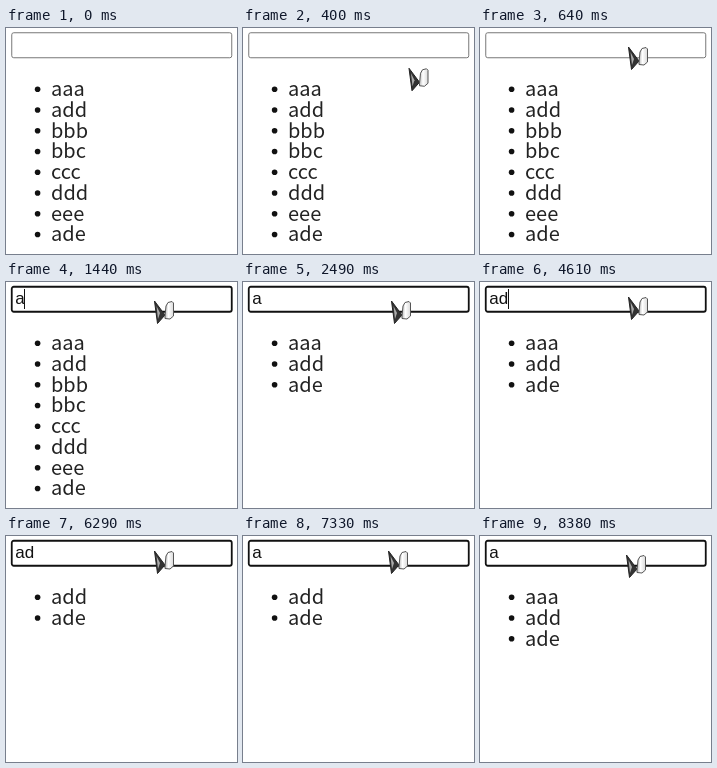
Write an HTML page with a canvas that moves like this. It is 231 px wide and 226 px high and loops after 8.62 s.

```html
<!DOCTYPE html>
<html lang="en">
<head>
<meta charset="utf-8">
<title>Filter list</title>
<style>
html, body { margin: 0; width: 100%; height: 100%; overflow: hidden; background: #fff; }
canvas { display: block; width: 231px; height: 226px; }
</style>
</head>
<body>
<canvas id="stage"></canvas>
<script>
const W = 231, H = 226, LOOP = 8620;
const FOCUS = 720, BLINK = 538, FILTER_DELAY = 1040;
const canvas = document.getElementById('stage');
const ctx = canvas.getContext('2d');
const dpr = window.devicePixelRatio || 1;
canvas.width = W * dpr;
canvas.height = H * dpr;

const words = ['aaa', 'add', 'bbb', 'bbc', 'ccc', 'ddd', 'eee', 'ade'];
const edits = [
  { time: FOCUS, text: '' }, { time: 1440, text: 'a' },
  { time: 4610, text: 'ad' }, { time: 6450, text: 'a' }
];
// Places where the pointer rests after it has come in.
const rests = [
  { time: 640, x: 149, y: 19 }, { time: 3320, x: 149, y: 17 },
  { time: 3540, x: 149, y: 20 }, { time: 4290, x: 149, y: 15 },
  { time: 6930, x: 146, y: 15 }, { time: 7850, x: 147, y: 19 }
];

const latest = (list, t) => list.findLast(e => e.time <= t);
const textAt = t => latest(edits, t)?.text ?? '';

// The blink restarts on focus and typing, but not on deleting.
function caretOn(t) {
  const inserts = edits.filter((e, i) => !i || e.text.length > edits[i - 1].text.length);
  const last = latest(inserts, t);
  return last && Math.floor((t - last.time) / BLINK) % 2 === 0;
}

function pointerAt(t) {
  if (t < 160) return null;
  const rest = latest(rests, t);
  if (rest) return rest;
  const left = (1 - Math.floor((t - 160) / 80) / 6) ** 2;
  return { x: 149 + 70 * left, y: 19 + 85 * left };
}

function poly(points, fill, stroke) {
  ctx.beginPath();
  points.forEach(([x, y]) => ctx.lineTo(x, y));
  ctx.closePath();
  ctx.fillStyle = fill;
  ctx.fill();
  if (!stroke) return;
  ctx.strokeStyle = stroke;
  ctx.lineWidth = 1;
  ctx.stroke();
}

function drawPointer({ x, y }) {
  ctx.save();
  ctx.translate(x, y);
  ctx.lineJoin = 'round';
  const shade = ctx.createLinearGradient(9, 0, 18, 0);
  shade.addColorStop(0, '#aaa');
  shade.addColorStop(0.5, '#fff');
  shade.addColorStop(1, '#ddd');
  poly([[-0.5, 0], [10, 14], [2.5, 22.5]], '#333', '#222');
  poly([[1.5, 5], [5, 12], [3, 18]], '#aaa');
  poly([[10, 15], [11, 5], [13, 1.5], [17, 0.5], [18.5, 2],
        [18.5, 15], [15, 18], [10, 17.5]], shade, '#555');
  ctx.restore();
}

function drawField(t) {
  const focused = t >= FOCUS;
  ctx.beginPath();
  ctx.roundRect(5.75, 4.75, 220, 25, 2);
  ctx.lineWidth = focused ? 1.8 : 1;
  ctx.strokeStyle = focused ? '#111' : '#777';
  ctx.stroke();

  const text = textAt(t);
  ctx.font = '17px "Liberation Sans", Arial, sans-serif';
  ctx.fillStyle = '#111';
  ctx.fillText(text, 9.3, 22.3);
  if (caretOn(t)) {
    ctx.fillRect(Math.round(9 + ctx.measureText(text).width), 7, 1, 20);
  }
}

function drawList(t) {
  const query = textAt(t - FILTER_DELAY);
  ctx.font = '300 20px "Noto Sans CJK JP", "Noto Sans", sans-serif';
  words.filter(w => w.startsWith(query)).forEach((word, i) => {
    const y = i * 20.75;
    ctx.fillStyle = '#111';
    ctx.beginPath();
    ctx.arc(31.6, 61.3 + y, 2.8, 0, 2 * Math.PI);
    ctx.fill();
    ctx.fillStyle = '#222';
    ctx.fillText(word, 45, Math.round(68 + y));
  });
}

function draw(t) {
  ctx.setTransform(dpr, 0, 0, dpr, 0, 0);
  ctx.fillStyle = '#fff';
  ctx.fillRect(0, 0, W, H);
  drawField(t);
  drawList(t);
  const place = pointerAt(t);
  if (place) drawPointer(place);
}

const start = performance.now();
function tick() {
  draw((performance.now() - start) % LOOP);
  requestAnimationFrame(tick);
}
tick();
</script>
</body>
</html>
```
